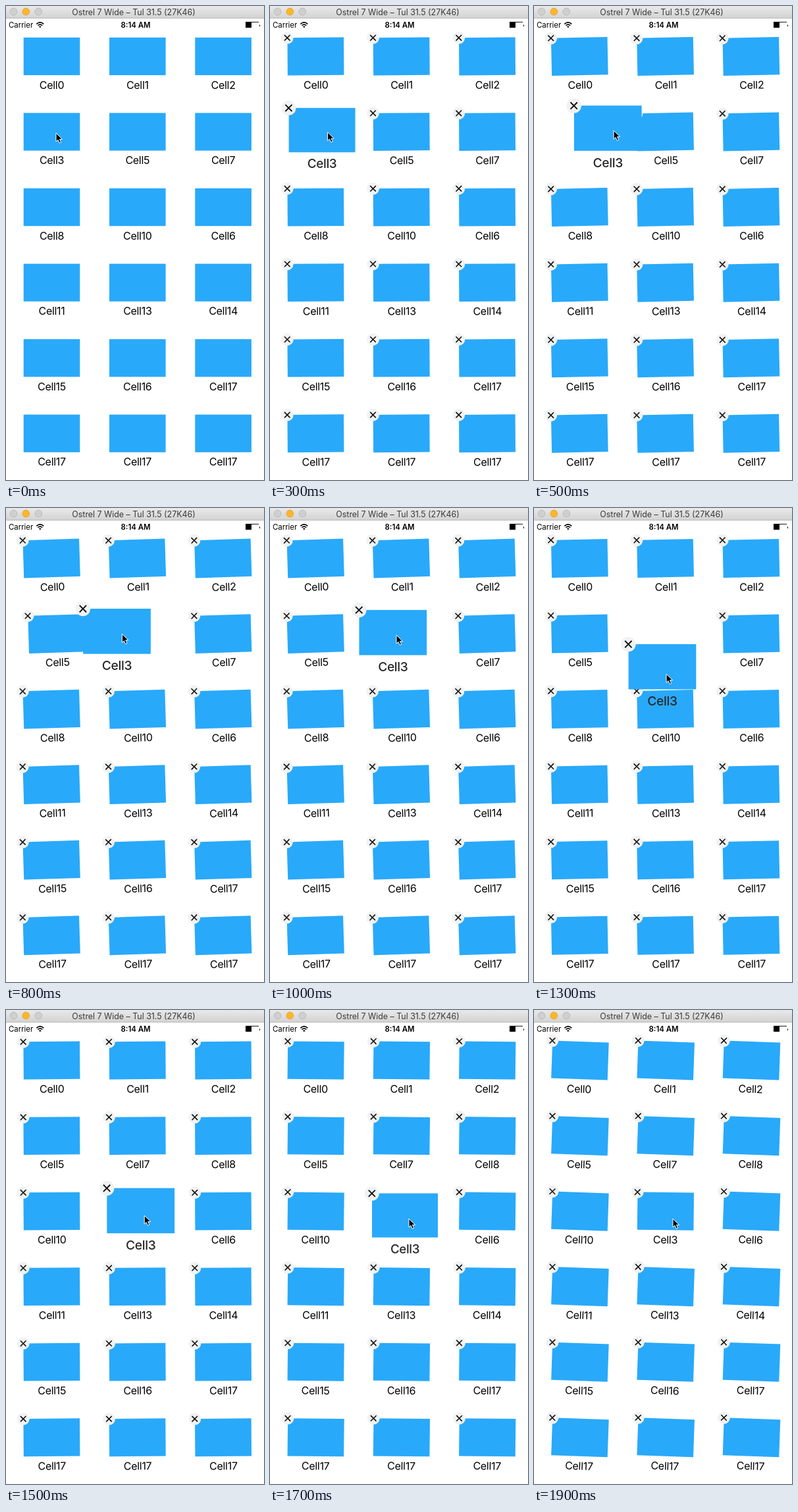
Write an HTML page that moves like this. It is 392 px wide and 720 px high and loops after 2000 ms.

```html
<!DOCTYPE html>
<html lang="en">
<head>
<meta charset="utf-8">
<title>Rearrangeable grid</title>
<style>
  html, body { margin: 0; width: 100%; height: 100%; overflow: hidden; background: #fff; }
  svg { display: block; width: 100%; height: 100%; }
  text { font-family: Inter, Roboto, sans-serif; }
  .middle { text-anchor: middle; }
  .title { font-size: 12.4px; fill: #3a3a3a; }
  .status { font-size: 11.4px; }
  .time { font-weight: 600; }
  .label { font-size: 16px; letter-spacing: -.3px; text-anchor: middle; }
  .lifted .label { fill: #262626; font-weight: 500; }
  .tile { fill: #29a9fa; }
  .badge circle { fill: #f1f2f2; }
  .badge path { stroke: #111; stroke-width: 1.6; }
</style>
</head>
<body>
<svg viewBox="0 0 392 720">
  <defs>
    <linearGradient id="bar" x2="0" y2="1">
      <stop stop-color="#e9e9e9"/><stop offset="1" stop-color="#d2d2d2"/>
    </linearGradient>
  </defs>
  <rect width="392" height="720" fill="#fff"/>
  <rect width="392" height="19" fill="url(#bar)"/>
  <path d="M0 18.5H392" stroke="#b8b8b8"/>
  <g stroke-width=".8" fill="#cfcfcf" stroke="#b5b5b5">
    <circle cx="11.5" cy="8.5" r="5.4"/>
    <circle cx="30.3" cy="8.5" r="5.4" fill="#fdb52b" stroke="#dfa023"/>
    <circle cx="49.3" cy="8.5" r="5.4"/>
  </g>
  <text class="title middle" x="194" y="13.5">Ostrel 7 Wide – Tul 31.5 (27K46)</text>

  <text class="status" x="4" y="33">Carrier</text>
  <g fill="none" stroke="#000" stroke-width="1.6">
    <path d="M46.3 27.3Q51.8 22.4 57.3 27.3M48.4 29.6Q51.8 26.6 55.2 29.6"/>
    <path d="M51.8 33.2L50 31.3Q51.8 29.9 53.6 31.3Z" fill="#000" stroke="none"/>
  </g>
  <text class="status time middle" x="197" y="33">8:14 AM</text>
  <path d="M364 24H373V33H364Z"/>
  <path d="M373 24.5H384" stroke="#000" stroke-width=".9"/>
  <path d="M385.5 28.5V31" stroke="#000"/>

  <g id="cells"></g>
  <path id="cursor" d="M0 0V13L3 10.3L5.2 15.2L7.6 14.2L5.4 9.4H9.6Z" stroke="#fff" stroke-linejoin="round"/>
</svg>
<script>
  const LOOP = 2000, STEP = 100, EDIT_START = 100, DROP = 1650, SETTLE = 200;
  const HELD = 3, TARGET = 7, LAG = 20;
  const labels = "0 1 2 3 5 7 8 10 6 11 13 14 15 16 17 17 17 17".split(" ");

  const mix = (a, b, k) => a + (b - a) * k;
  const mixPoint = (a, b, k) => a.map((v, axis) => mix(v, b[axis], k));

  // Eased progress from 0 to 1 over a span of time.
  function progress(t, start, length) {
    const k = Math.min(1, Math.max(0, (t - start) / length));
    return k * k * (3 - 2 * k);
  }

  const slot = i => [69.5 + 130.3 * (i % 3), 88 + 114.55 * Math.floor(i / 3)];

  // The pointer sweeps right along a slight arc, then pulls down.
  function pointer(t) {
    const across = progress(t, 130, 870), down = progress(t, 1055, 505);
    return [
      76 + 116 * across + 19 * down,
      193 - 4 * Math.sin(Math.PI * across) + 124 * down
    ];
  }

  // The fast wiggle, seen at the step rate, drifts along a parabola.
  const tilt = t => 3.8 * ((t - 900) / 1000) ** 2 - 1.8;

  // Cells between the old and new gap move one slot back.
  function cellPosition(i, t) {
    let k = 0;
    if (i === HELD + 1) k = progress(t, 600, 235);
    else if (i > HELD && i <= TARGET) k = progress(t, 1300, 200);
    return mixPoint(slot(i), slot(i - 1), k);
  }

  const layer = document.getElementById("cells");
  const cursor = document.getElementById("cursor");
  const cells = labels.map(label => {
    const cell = document.createElementNS("http://www.w3.org/2000/svg", "g");
    cell.innerHTML = `<rect class="tile" x="-42.8" y="-40.1" width="85.6" height="57.2"/>
      <text class="label" y="37.6">Cell${label}</text>
      <g class="badge" transform="translate(-43 -40)">
        <circle r="9.4"/><path d="M-4.3 -4.3L4.3 4.3M-4.3 4.3L4.3 -4.3"/>
      </g>`;
    layer.append(cell);
    return cell;
  });
  layer.append(cells[HELD]);

  function place(cell, [x, y], angle, scale) {
    cell.setAttribute("transform", `translate(${x} ${y}) rotate(${angle}) scale(${scale})`);
  }

  function placeHeld(t) {
    const lift = progress(t, EDIT_START, 250), settle = progress(t, DROP, SETTLE);
    const [x, y] = pointer(t - LAG);
    const dragged = mixPoint(slot(HELD), [x - 5, y + 10], lift);
    place(cells[HELD], mixPoint(dragged, slot(TARGET), settle),
      0.3 * tilt(t) * settle, 1 + 0.2 * (lift - settle));
    cells[HELD].classList.toggle("lifted", lift > settle);
  }

  function draw(t) {
    const editing = t >= EDIT_START;
    cells.forEach((cell, i) => {
      cell.lastElementChild.style.display = editing ? "" : "none";
      if (i !== HELD) place(cell, cellPosition(i, t), editing ? tilt(t) : 0, 1);
    });
    placeHeld(t);
    cursor.setAttribute("transform", `translate(${pointer(t)})`);
  }

  const origin = performance.now();
  function tick() {
    const t = (performance.now() - origin) % LOOP;
    draw(Math.floor(t / STEP) * STEP);
    requestAnimationFrame(tick);
  }
  tick();
</script>
</body>
</html>
```
